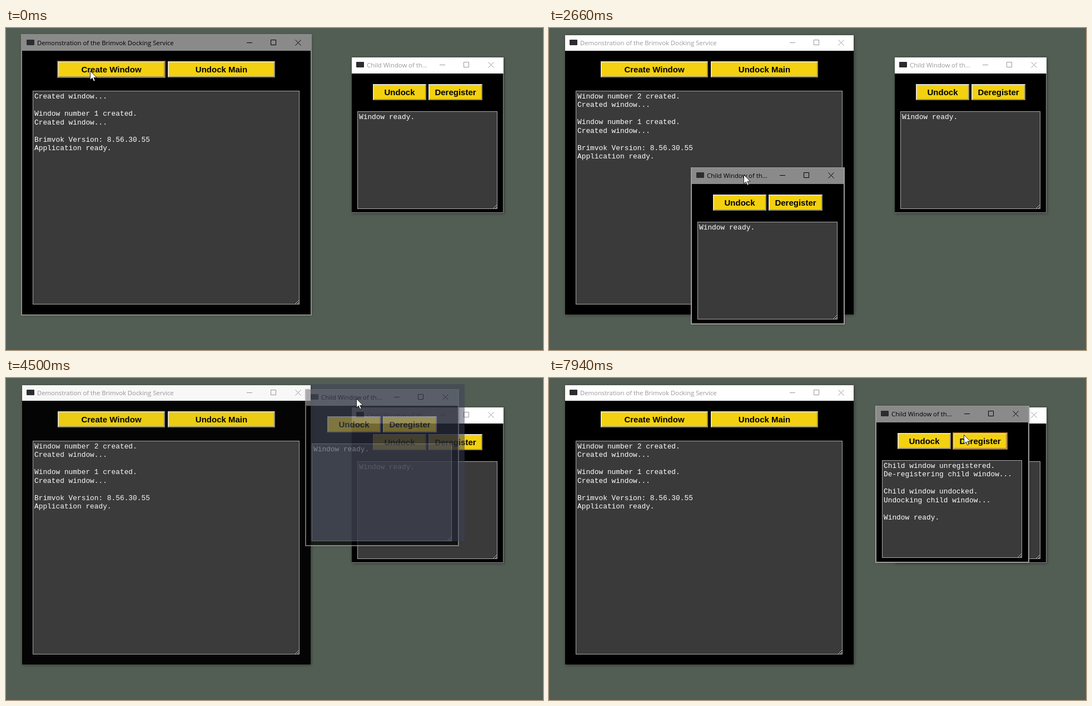
An HTML page for the animation above (8 s loop, 966x580 px).

```html
<!DOCTYPE html>
<html lang="en">
<head>
<meta charset="utf-8">
<title>Window docking</title>
<style>
  html, body { margin: 0; width: 100%; height: 100%; overflow: hidden; background: #525d53; }
  #stage { position: relative; width: 966px; height: 580px; overflow: hidden; background: #525d53; }

  .win {
    --bar: #fff; --ink: #999; --edge: transparent; --min: var(--ink);
    position: absolute; width: 273px; height: 280px; isolation: isolate;
    background: #000; box-shadow: 1px 1px 5px rgba(0, 0, 0, .4);
  }
  .win::before { content: ""; position: absolute; inset: -1px -2px -2px; background: var(--edge); z-index: -2; }
  .win::after {
    content: ""; position: absolute; inset: 0; box-sizing: border-box; z-index: -1;
    border: solid #8c8c8c; border-width: 0 1px 1px 0; background: #000;
  }
  .bar {
    position: absolute; inset: 0 0 auto; height: 29px; background: var(--bar); color: var(--ink);
    font: 11.3px/27px "Open Sans", "Noto Sans", sans-serif; text-indent: 27px; white-space: nowrap;
  }
  .bar i { position: absolute; left: 8px; top: 8px; width: 14px; height: 10px; border-radius: 1px; background: #2c2c2f; }
  .bar svg { position: absolute; right: 0; top: 0; width: 132px; height: 29px; }
  .btn {
    position: absolute; top: 48px; left: 38px; width: 96px; height: 29px; box-sizing: border-box;
    border: 2px solid; border-color: #e4e0cc #908c78 #908c78 #e4e0cc;
    background: #f3d111; color: #000; text-align: center;
    font: bold 15px/25px "Liberation Sans", Arial, sans-serif;
  }
  .btn + .btn { left: 138px; width: 97px; }
  .btn::after { content: ""; position: absolute; inset: -3px; border: 2px solid #e5970c; opacity: 0; }
  .log {
    position: absolute; left: 10px; top: 97px; width: 252px; height: 176px; box-sizing: border-box;
    border: 1px solid #a9a9a9; padding: 2px; background: #3a3a3a;
  }
  .log pre {
    margin: 0; height: 100%; overflow: hidden; color: #fff;
    font: 12.84px/15.43px "Liberation Mono", "Courier New", monospace;
  }
  .log span { display: block; }
  .log svg { position: absolute; right: 0; bottom: 0; width: 9px; height: 9px; }

  #main { left: 29px; top: 13px; width: 519px; height: 503px; }
  #main::before { top: -2px; }
  #main::after { border: 0; }
  #main .bar { height: 28px; }
  #main .btn { left: 64px; top: 47px; width: 193px; }
  #main .btn + .btn { left: 262px; }
  #main .log { left: 19px; top: 100px; width: 480px; height: 385px; }
  #first { left: 622px; top: 53px; }
  #child, #cursor { left: 0; top: 0; }
  #child::after { border-color: var(--side); }
  #preview { position: absolute; left: 548px; top: 11px; width: 277px; height: 283px; background: #3d4059; opacity: 0; }
  #cursor { position: absolute; width: 14px; height: 21px; overflow: visible; }

  /* One 8 s loop; every change is a hard step. */
  #main, #main span, #main .first::after,
  #child, #child span, #child .btn::after, #hover, #preview, #cursor {
    animation: 8s step-end infinite;
  }
  #main { animation-name: main; }
  #main span { animation-name: main-log; }
  #main .first::after { animation-name: main-focus; }
  #child { animation-name: child, child-look; }
  #child span { animation-name: child-log; }
  #child .first::after { animation-name: undock-focus; }
  #child .second::after { animation-name: deregister-focus; }
  #hover { animation-name: hover; }
  #preview { animation-name: preview; }
  #cursor { animation-name: cursor; }

  @keyframes main {
    0% { --bar: #8a8a8a; --ink: #000; --edge: #8c8c8c; opacity: 1; }
    33.25% { --bar: #fff; --ink: #999; --edge: transparent; opacity: 1; }
    48.75% { --bar: #fff; --ink: #999; --edge: transparent; opacity: .96; }
    58.75%, 100% { --bar: #fff; --ink: #999; --edge: transparent; opacity: 1; }
  }
  @keyframes main-log {
    0% { transform: translateY(-15.43px); }
    2.5%, 100% { transform: none; }
  }
  @keyframes main-focus { 0% { opacity: .6; } 33.25%, 100% { opacity: 0; } }

  @keyframes child {
    0%, 2.5% { transform: translate(248px, 257px); }
    33.25% { transform: translate(257px, 252px); }
    36% { transform: translate(272px, 235px); }
    38.5% { transform: translate(345px, 160px); }
    41.125% { transform: translate(445px, 66px); }
    43.625% { transform: translate(509px, 19px); }
    46% { transform: translate(525px, 17px); }
    48.75% { transform: translate(548px, 18px); }
    51.25% { transform: translate(565px, 20px); }
    53.75% { transform: translate(552px, 21px); }
    56.25% { transform: translate(540px, 21px); }
    58.75% { transform: translate(550px, 12px); }
    74%, 100% { transform: translate(589px, 51px); }
  }
  @keyframes child-look {
    0% { opacity: 0; }
    2.5% { opacity: 1; --bar: #fff; --ink: #999; --min: #999; --edge: transparent; --side: #8c8c8c; }
    18.25% { opacity: 1; --bar: #fff; --ink: #999; --min: #000; --edge: transparent; --side: #8c8c8c; }
    25.75% { opacity: 1; --bar: #fff; --ink: #999; --min: #999; --edge: transparent; --side: #8c8c8c; }
    33.25% { opacity: 1; --bar: #8a8a8a; --ink: #000; --min: #000; --edge: #9c9c9c; --side: #000; }
    36% { opacity: .7; --bar: #8a8a8a; --ink: #000; --min: #000; --edge: #9c9c9c; --side: #000; }
    58.75%, 100% { opacity: 1; --bar: #8a8a8a; --ink: #000; --min: #000; --edge: #9c9c9c; --side: #000; }
  }
  @keyframes child-log {
    0% { transform: translateY(-92.58px); }
    74% { transform: translateY(-46.29px); }
    91.625% { transform: translateY(-15.43px); }
    94.125%, 100% { transform: none; }
  }
  @keyframes undock-focus { 0% { opacity: 0; } 74% { opacity: .75; } 91.625%, 100% { opacity: 0; } }
  @keyframes deregister-focus { 0% { opacity: 0; } 91.625%, 100% { opacity: .75; } }
  @keyframes hover { 0% { opacity: 0; } 18.25% { opacity: 1; } 25.75%, 100% { opacity: 0; } }
  @keyframes preview { 0% { opacity: 0; } 48.75% { opacity: .5; } 58.75%, 100% { opacity: 0; } }

  @keyframes cursor {
    0%, 2.5% { transform: translate(151px, 77px); }
    5.125% { transform: translate(165px, 88px); }
    7.75% { transform: translate(220px, 128px); }
    10.5% { transform: translate(295px, 184px); }
    13.125% { transform: translate(347px, 221px); }
    15.625% { transform: translate(376px, 243px); }
    18.25% { transform: translate(395px, 256px); }
    25.75% { transform: translate(362px, 264px); }
    28.25% { transform: translate(341px, 268px); }
    33.25% { transform: translate(350px, 264px); }
    36% { transform: translate(365px, 247px); }
    38.5% { transform: translate(438px, 172px); }
    41.125% { transform: translate(538px, 78px); }
    43.625% { transform: translate(602px, 31px); }
    46% { transform: translate(618px, 29px); }
    48.75% { transform: translate(641px, 31px); }
    51.25% { transform: translate(656px, 34px); }
    53.75% { transform: translate(643px, 36px); }
    56.25% { transform: translate(630px, 37px); }
    63.875% { transform: translate(639px, 46px); }
    66.375% { transform: translate(656px, 60px); }
    68.875% { transform: translate(667px, 68px); }
    76.625% { transform: translate(652px, 69px); }
    81.75% { transform: translate(664px, 77px); }
    84.25% { transform: translate(700px, 92px); }
    86.875% { transform: translate(738px, 101px); }
    89.25% { transform: translate(756px, 102px); }
    99.25%, 100% { transform: translate(746px, 102px); }
  }
</style>
</head>
<body>
<svg width="0" height="0" style="position:absolute">
  <symbol id="controls" viewBox="-132 0 132 29">
    <g fill="none" stroke="var(--ink)">
      <path d="M-115 13.5h10" stroke="var(--min)"/>
      <path d="M-71.5 8.5h9v9h-9zM-27.5 8.5l10 10m0-10l-10 10"/>
    </g>
  </symbol>
  <symbol id="grip" viewBox="0 0 9 9">
    <path d="M1 9L9 1M5 9L9 5" stroke="#111" fill="none"/>
    <path d="M2 9L9 2M6 9L9 6" stroke="#ccc" fill="none"/>
  </symbol>
</svg>

<div id="stage">
  <div class="win" id="main">
    <div class="bar"><i></i>Demonstration of the Brimvok Docking Service<svg><use href="#controls"/></svg></div>
    <b class="btn first">Create Window</b><b class="btn">Undock Main</b>
    <div class="log"><pre><span>Window number 2 created.
Created window...

Window number 1 created.
Created window...

Brimvok Version: 8.56.30.55
Application ready.</span></pre><svg><use href="#grip"/></svg></div>
  </div>

  <div class="win" id="first">
    <div class="bar"><i></i>Child Window of th...<svg><use href="#controls"/></svg></div>
    <b class="btn">Undock</b><b class="btn">Deregister</b>
    <div class="log"><pre>Window ready.</pre><svg><use href="#grip"/></svg></div>
  </div>

  <div class="win" id="child">
    <div class="bar"><i></i>Child Window of th...<svg><rect id="hover" width="44" height="27" fill="#e5e5e5"/><use href="#controls"/></svg></div>
    <b class="btn first">Undock</b><b class="btn second">Deregister</b>
    <div class="log"><pre><span>Child window unregistered.
De-registering child window...

Child window undocked.
Undocking child window...

Window ready.</span></pre><svg><use href="#grip"/></svg></div>
  </div>

  <div id="preview"></div>
  <svg id="cursor" viewBox="0 0 14 21">
    <path d="M.5 .5V16.6L4.2 13L6.7 19L9.3 17.9L6.8 12.2H12Z" fill="#fff" stroke="#000" stroke-width=".8"/>
  </svg>
</div>
</body>
</html>
```
